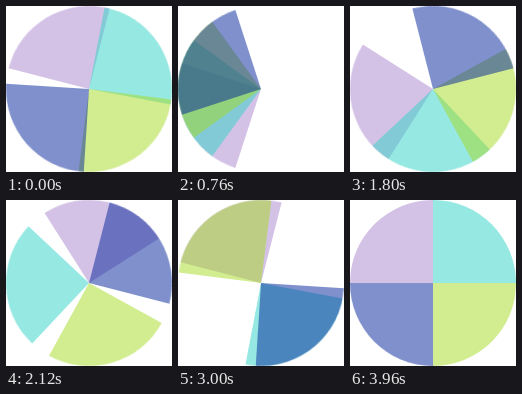
Animation of 166x166 px, one loop 4000 ms. Source, as an HTML page:

```html
<!DOCTYPE html>
<html lang="en">
<head>
<meta charset="utf-8">
<title>Turning quarters</title>
<style>
  html, body { margin: 0; width: 100%; height: 100%; overflow: hidden; background: #fff; }
  svg { display: block; width: 100%; height: 100%; }
  /* Every quarter makes a whole number of turns per loop, in 100 ticks. */
  .quarter {
    fill-opacity: .5;
    transform-origin: 0 0;
    animation: turn 4s steps(100) -41ms infinite;
  }
  @keyframes turn {
    from { transform: rotate(var(--start)); }
    to { transform: rotate(calc(var(--start) + var(--turns) * 360deg)); }
  }
  .lavender { --start: 270deg; --turns: 4; fill: #a985cd; }
  .cyan { --start: 0deg; --turns: 3; fill: #2fd1c5; }
  .lime { --start: 90deg; --turns: 2; fill: #a5d923; }
  .blue { --start: 180deg; --turns: 1; fill: #012399; }
</style>
</head>
<body>
<svg viewBox="-83 -83 166 166">
  <defs><path id="wedge" d="M0 0V-83A83 83 0 0 1 83 0Z"/></defs>
  <g class="quarter lavender"><use href="#wedge"/></g>
  <g class="quarter cyan"><use href="#wedge"/></g>
  <g class="quarter lime"><use href="#wedge"/></g>
  <g class="quarter blue"><use href="#wedge"/></g>
</svg>
</body>
</html>
```
